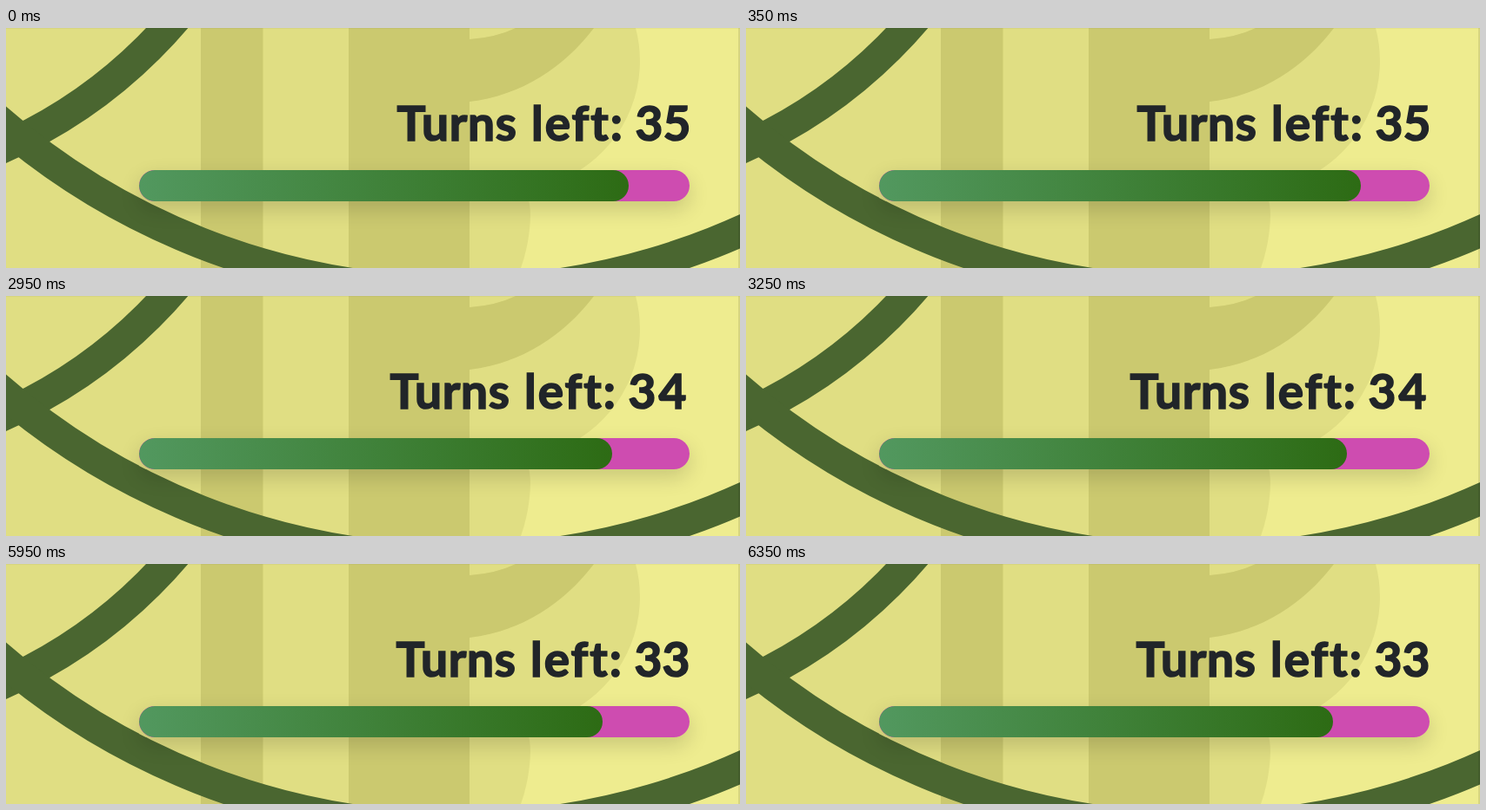
Recreate the animation shown at these times as an HTML page. Size 844x277 px, loop 8 s.

```html
<!DOCTYPE html>
<html lang="en">
<head>
<meta charset="utf-8">
<title>Turns left</title>
<style>
  html, body { margin: 0; width: 100%; height: 100%; overflow: hidden; background: #eeec8f; }
  #stage { position: relative; width: 844px; height: 277px; overflow: hidden; }
  svg { position: absolute; left: 0; top: 0; }
  text {
    font: 700 55px Lato, "Open Sans", sans-serif;
    fill: #212529; stroke: #212529; stroke-width: 1.6px;
  }
  #shadow, #bar {
    position: absolute; left: 153px; top: 164px; width: 633px; height: 36px;
    border-radius: 18px;
  }
  #shadow { box-shadow: 0 9px 24px rgba(0, 0, 0, .16); }
  #bar { overflow: hidden; background: #ce4cb0; }
  #fill {
    height: 100%; border-radius: 18px;
    background: linear-gradient(to right, #52985f, #2d6b14);
  }
</style>
</head>
<body>
<div id="stage">
  <svg width="844" height="277" viewBox="0 0 844 277">
    <rect width="844" height="277" fill="#eeec8f"/>
    <path fill="#e0de83" d="M0 0H724A149.5 149.5 0 0 1 660 164Q633 183 599 191Q603 203 603 217Q602 249 592 277H0Z"/>
    <g fill="#cbc96f">
      <path d="M224 0H295.5V277H224Z"/>
      <path d="M394 0H533V277H394Z"/>
      <path d="M533 13Q563 11 586 0H676C642 45 593 78 533 85Z"/>
    </g>
    <g fill="none" stroke="#4a6630" stroke-width="36">
      <circle cx="-230" cy="-371" r="557"/>
      <circle cx="518" cy="-498" r="802"/>
    </g>
    <rect width="844" height="1" fill="#000" opacity=".04"/>
    <rect x="842" width="2" height="277" fill="#000" opacity=".1"/>
    <g id="label">
      <text x="449.5" y="130" letter-spacing=".7">Turns</text>
      <text x="604" y="130" letter-spacing="2">left:</text>
      <text id="count" x="723.5" y="130">35</text>
    </g>
  </svg>
  <div id="shadow"></div>
  <div id="bar"><div id="fill"></div></div>
</div>
<script>
const LOOP = 8000, STEP = 50, EASE_MS = 600;
const FULL = 633, MAX_TURNS = 40;

// start: when the bar begins to shrink; shift and gap: label layout
const turns = [
  { start: -155, left: 35, shift: 0, gap: 0 },
  { start: 2735, left: 34, shift: -8, gap: 3 },
  { start: 5830, left: 33, shift: -1, gap: 0 }
];

const label = document.getElementById("label");
const count = document.getElementById("count");
const fill = document.getElementById("fill");

const bezier = (a, b, u) => 3 * a * u * (1 - u) ** 2 + 3 * b * u * u * (1 - u) + u ** 3;

// CSS "ease"
function ease(p) {
  if (p <= 0) return 0;
  if (p >= 1) return 1;
  let lo = 0, hi = 1;
  for (let i = 0; i < 24; i++) {
    const mid = (lo + hi) / 2;
    if (bezier(.25, .25, mid) < p) lo = mid; else hi = mid;
  }
  return bezier(.1, 1, lo);
}

function draw(ms) {
  const t = Math.floor((ms % LOOP) / STEP) * STEP;
  const turn = turns.filter(s => s.start <= t).pop();
  const value = turn.left + 1 - ease((t - turn.start) / EASE_MS);
  fill.style.width = FULL * value / MAX_TURNS + "px";
  label.setAttribute("transform", `translate(${turn.shift} 0)`);
  count.setAttribute("letter-spacing", turn.gap);
  if (count.textContent !== String(turn.left)) count.textContent = turn.left;
}

const begin = performance.now();
function tick() {
  draw(performance.now() - begin);
  requestAnimationFrame(tick);
}
draw(0);
requestAnimationFrame(tick);
</script>
</body>
</html>
```
